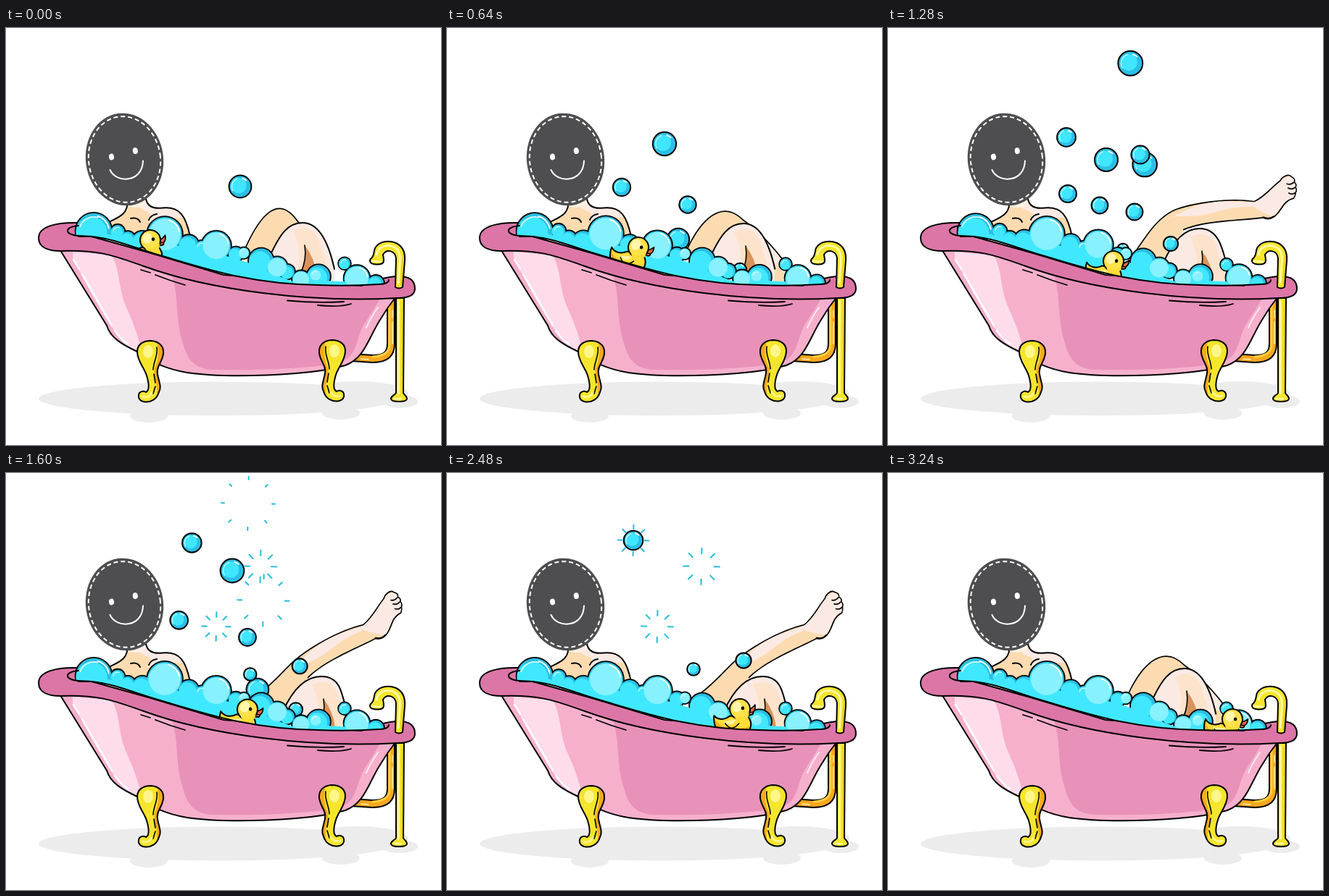
An HTML page with a canvas that plays this animation: 600x576 px, repeating every 3.28 s.

```html
<!DOCTYPE html>
<html lang="en">
<head>
<meta charset="utf-8">
<title>Bubble bath</title>
<style>
  html, body { margin: 0; width: 100%; height: 100%; overflow: hidden; background: #fff; }
  canvas { display: block; width: 600px; height: 576px; }
</style>
</head>
<body>
<canvas id="stage" width="600" height="576"></canvas>
<script>
const ctx = document.getElementById('stage').getContext('2d');
const LOOP = 3280, STEP = 40, REPEAT = 800, POP = 340, TAU = Math.PI * 2;
const rad = deg => deg * Math.PI / 180;

// ---------- helpers ----------
function draw(d, fill, stroke, width = 2) {
  const p = typeof d === 'string' ? new Path2D(d) : d;
  if (fill) { ctx.fillStyle = fill; ctx.fill(p); }
  if (stroke) { ctx.strokeStyle = stroke; ctx.lineWidth = width; ctx.stroke(p); }
}
function oval(x, y, rx, ry = rx, rot = 0) {
  const p = new Path2D();
  p.ellipse(x, y, rx, ry, rot, 0, TAU);
  return p;
}
function arc(x, y, r, from, to, color, width) {
  const p = new Path2D();
  p.arc(x, y, r, rad(from), rad(to));
  draw(p, null, color, width);
}
function inside(clip, paint) {
  ctx.save();
  ctx.clip(new Path2D(clip));
  paint();
  ctx.restore();
}
// Rows are [time, ...values]; returns the blended values.
function at(rows, t) {
  let i = 0;
  while (i < rows.length - 2 && t >= rows[i + 1][0]) i++;
  const a = rows[i], b = rows[i + 1];
  const k = Math.min(1, Math.max(0, (t - a[0]) / (b[0] - a[0])));
  return a.slice(1).map((v, n) => v + (b[n + 1] - v) * k);
}

// ---------- tub ----------
const INNER = 'C88,288 105,287 118,288 C150,291 180,305 216,315 C280,334 340,354 430,355 C470,357 500,355 515,354 C524,354 528,351 528,348';
const ABOVE = 'M85,0 L85,281 ' + INNER + ' L600,345 L600,0 Z';
const RIM = 'M100,269 C70,268 45,274 45,290 C45,303 58,308 75,308 C130,306 150,315 190,329 C280,362 420,380 540,373 C557,373 564,368 564,360 C564,348 555,343 542,343 Q530,343 512,348 L490,356 L300,341 L200,311 L118,288 L100,288 Z';
const TUB = 'M73,304 L139,411 C144,428 160,437 181,447 C200,461 220,471 250,476 C290,482 350,481 400,477 Q440,474 468,466 C495,456 500,428 516,403 Q526,386 538,371 L400,366 L250,340 L150,306 Z';

function ground() {
  const gray = '#ececec';
  draw(oval(292, 512, 247, 23.5), gray);
  draw(oval(485, 505, 70, 17), gray);
  draw(oval(543, 516, 25, 9), gray);
  draw(oval(197, 536, 26, 9), gray);
  draw(oval(462, 532, 26, 9), gray);
}

function drain() {
  const d = 'M531,372 L531,436 C531,452 522,457 506,457 L476,455';
  draw(d, null, '#000', 12);
  draw(d, null, '#f8a81e', 8);
  draw('M529,380 L529,436 C529,449 520,453 506,454', null, '#ffd13c', 3);
  draw('M533,390 v10 m0,6 v30 M490,457 l10,1', null, '#fff1b0', 1.5);
}

function tub() {
  draw(TUB, '#f6b0cc');
  inside(TUB, () => {
    draw('M92,309 L146,314 C158,335 154,358 166,386 Q182,420 188,452 L168,441 Q145,420 92,318 Z', '#fedcea');
    draw('M226,335 C240,365 232,400 244,435 C250,460 262,471 285,472 Q380,474 455,464 C488,455 480,430 496,406 Q508,388 518,370 L380,355 Z', '#e892b9');
    draw('M93,320 l8,13 m4,7 l41,71 m4,7 q8,12 18,18', null, '#fff', 2.5);
    draw('M497,414 Q503,400 513,386', null, '#ffe6f1', 2);
  });
  draw(TUB, null, '#000');
  draw(RIM, '#dc76a7', '#000');
}

function rimLines() {
  draw('M100,273 C90,274 84,277 85,281 ' + INNER, null, '#000');
  draw('M186,334 l13,4 m7,3 q20,8 41,14 M388,376.5 q40,4 78,1.5 M430,383 q30,3 46,-2', null, '#000', 1.8);
}

const FOOT = 'M181,447 C181,438 188,432 200,432 C212,433 218,440 217,450 C215,463 207,467 209,478 C211,490 215,495 211,503 C208,513 200,517 192,516.5 C184,516 181,510 184,504 Q188,500 193,503 C199,500 197,490 194,480 C190,468 181,460 181,447 Z';
function foot() {
  draw(FOOT, '#f5e52c');
  inside(FOOT, () => draw('M207,430 L222,440 L222,500 L205,518 C213,495 203,485 205,470 Q214,450 207,430 Z', '#f6a91f'));
  draw('M208,441 C210,452 203,462 203,472 m1,6 l2,12 m0,5 l-3,10', null, '#000', 1.6);
  draw(FOOT, null, '#000');
  draw(oval(196, 447, 7, 9), '#fff68a');
  draw('M188,509 Q196,512 201,504', null, '#fff68a', 3);
}
function feet() {
  foot();
  ctx.save();
  ctx.translate(649, -1);
  ctx.scale(-1, 1);
  foot();
  ctx.restore();
}

function faucet() {
  const yellow = '#f5e52c', shine = '#fffaa8', shade = '#e3c91c';
  draw('M538,373 V504 C537,507 531,508 531,512 Q531,516 542,516 Q553,516 553,512 C553,508 549,507 548,504 L549,373 Z', yellow, '#000');
  draw('M541.5,377 V505 M536,512 h9', null, shine, 2.5);
  draw('M546.5,378 V503', null, shade, 1.5);
  const neck = 'M537,358 L538,318 C537,308 525,304 520,313 Q521,318 521,322 C520,327 513,327 507,326 C501,325 501,320 504,318 C508,315 507,309 509,304 C515,294 528,293 538,297 C548,302 551,311 550,322 L547,358 Q542,361 537,358 Z';
  draw(neck, yellow);
  draw('M511,313 C513,302 525,298 534,302 C543,306 544,314 543,326 L541,352', null, shine, 3);
  draw('M548,312 L545,354', null, shade, 1.5);
  draw('M505,322 l12,1', null, shine, 2.5);
  draw(neck, null, '#000');
}

// ---------- bather ----------
const SKIN = '#fddbb0', PALE = '#fbe9e3';

function torso() {
  const d = 'M167,238 C170,258 153,262 138,270 L130,310 L260,310 L254,288 C248,260 240,246 216,248.5 C204,250 195,247 193,236 Z';
  draw(d, SKIN);
  inside(d, () => {
    draw('M180,236 C180,254 196,250 200,258 Q192,272 212,280 L222,262 L246,262 L225,240 Z', PALE);
    draw('M167,240 L195,240 Q184,252 168,246 Z', '#fff1e4');
  });
  draw('M138,270 C153,262 170,258 167,238 M193,236 C195,247 204,250 216,248.5 C240,246 248,260 254,288 M172,263 q10,-2 13,5 M197,265 q3,-7 11,-8', null, '#000');
}

function head() {
  const tilt = rad(-8);
  draw(oval(163.5, 181.5, 53.5, 64, tilt), '#4e4e50');
  ctx.setLineDash([6, 4]);
  ctx.lineCap = 'butt';
  draw(oval(163.5, 181.5, 49.5, 59.5, tilt), null, '#fff', 2);
  ctx.lineCap = 'round';
  ctx.setLineDash([]);
  draw(oval(145.5, 178, 3.5, 4.4, tilt), '#fff');
  draw(oval(178.3, 169.7, 3.5, 4.4, tilt), '#fff');
  draw('M143.5,196 C152,215 188,214 189,183.5', null, '#fff');
}

// hip, two thigh handles, knee, shin angle, ankle bend, top of the bent leg
const POSE = {
  fold: [331,304, 350,262, 375,228, 402,268, 60, 0, 409,269],
  rise: [333,304, 350,268, 378,236, 408,266, 48, 0, 409,270],
  mid:  [343,308, 358,286, 373,262, 396,252, -7, -9, 430,277],
  up:   [350,305, 368,292, 383,274, 396,262, -29, 0, 435,281],
  flat: [341,308, 354,283, 366,264, 390,257, 0, 0, 430,275]
};
const LEGS = Object.entries({
  0: 'fold', 480: 'fold', 640: 'rise', 1280: 'mid', 1480: 'up',
  2480: 'up', 2800: 'flat', 3240: 'rise', 3280: 'fold'
}).map(([t, name]) => [+t, ...POSE[name]]);

function raisedLeg([hx, hy, ax, ay, bx, by, kx, ky, shin, bend], left) {
  const atKnee = paint => {
    ctx.save();
    ctx.translate(kx, ky);
    ctx.rotate(rad(shin));
    paint();
    ctx.restore();
  };
  const atAnkle = paint => atKnee(() => {
    ctx.translate(110, 2);
    ctx.rotate(rad(bend));
    paint();
  });
  const curve = (...c) => ctx.bezierCurveTo(...c);

  ctx.beginPath();
  ctx.moveTo(hx, hy);
  curve(ax, ay, bx, by, kx, ky);
  atKnee(() => curve(25, -6, 75, -8, 110, 2));
  atAnkle(() => {
    curve(15, -2, 30, -13, 43, -18);
    curve(46, -22, 56, -25, 58, -19);
    for (const [x, y] of [[59, -11], [59, -4], [57, 3], [53, 9]])
      ctx.quadraticCurveTo(x + 4, y - 4, x, y);
    curve(38, 8, 32, 22, 20, 26);
    curve(14, 28, 9, 26, 6, 23);
  });
  atKnee(() => curve(85, 24, 40, 18, 8, 27));
  ctx.strokeStyle = '#000';
  ctx.lineWidth = 3.4;
  ctx.stroke();
  ctx.lineTo(left + 15, 335);
  ctx.lineTo(hx, 335);
  ctx.fillStyle = SKIN;
  ctx.fill();
  ctx.save();
  ctx.clip();
  atKnee(() => draw('M-4,8 Q30,-6 62,-6 L108,2 L104,8 C75,2 55,12 30,11 Q15,10 -4,8 Z', PALE));
  atAnkle(() => draw('M-8,0 C15,-2 30,-13 43,-20 L64,-22 L62,12 L45,11 C33,14 30,22 20,26 Q8,20 -8,0 Z', PALE));
  ctx.restore();
  atAnkle(() => draw('M50,-12 q4,3 9,1 m-9,5 q4,4 9,2 m-10,5 q4,4 8,2 M6,23 q7,6 14,3', null, '#000', 1.7));
}

function bentLeg(x, y) {
  const k = (y - 269) / 12;
  const lx = x - 46 - 7 * k, ly = y + 48, rx = x + 44 - 9 * k, ry = y + 64 - 14 * k;
  const edge = new Path2D();
  edge.moveTo(lx, ly);
  edge.bezierCurveTo(lx + 15, ly - 33, x - 20, y, x, y);
  edge.bezierCurveTo(x + 24, y, rx - 7, ry - 32, rx, ry);
  const shape = new Path2D(edge);
  shape.lineTo(rx, 352);
  shape.lineTo(lx, 352);
  ctx.save();
  ctx.clip(shape);
  draw(shape, PALE);
  ctx.translate(x + 3, y + 31);
  draw('M-16,-19 C0,-28 14,-22 20,-6 L34,40 L-12,42 Q-1,10 -16,-19 Z', '#fde3cb');
  draw('M0,0 Q14,18 16,40 L-6,40 Q3,20 0,0 Z', '#d9935c');
  draw('M0,0 Q3,20 -5,37', null, '#000', 1.6);
  ctx.restore();
  draw(edge, null, '#000');
}

function legs(t) {
  const pose = at(LEGS, t), [x, y] = pose.slice(-2);
  raisedLeg(pose, x - 50);
  bentLeg(x, y);
}

// ---------- bubbles ----------
// Each rises along [time, x, y] points and pops at the last one.
const track = (r0, r1, ...path) => ({ r0, r1, path, start: path[0][0], end: path[path.length - 1][0] });
const TRACKS = [];
TRACKS.push(track(15.2, 17, [-160, 319, 292], [0, 323, 219], [480, 301, 182], [640, 300, 160], [1120, 336, 85], [1310, 334, 42]));
TRACKS.push(track(11.5, 13.3, [100, 245, 305], [480, 248, 229], [640, 241, 220], [1120, 234, 170], [1280, 246, 151], [1620, 257, 93]));
TRACKS.push(track(15, 17, [680, 345, 328], [1120, 352, 222], [1340, 355, 176]));
TRACKS.push(track(11, 12.8, [150, 335, 320], [480, 340, 254], [640, 332, 244], [1120, 335, 193], [1280, 348, 175], [1480, 351, 129]));
TRACKS.push(track(9, 11, [480, 405, 352], [640, 404, 334], [1120, 391, 312], [1280, 390, 298], [1680, 409, 259], [1960, 410, 221]));
TRACKS.push(track(11, 11.6, [760, 290, 305], [1120, 281, 262], [1280, 292, 245], [1500, 290, 212]));
TRACKS.push(track(8, 9, [1180, 322, 316], [1280, 324, 306], [1680, 340, 271], [1760, 337, 259]));

function bubble(x, y, r) {
  const disc = oval(x, y, r);
  draw(disc, '#2bbfe6');
  draw(oval(x - r * .12, y - r * .08, r * .68), '#40e6ff');
  arc(x, y, r * .76, 150, 250, '#b9f7ff', 1.5);
  arc(x, y, r * .76, 285, 315, '#fff', 1.8);
  draw(disc, null, '#000');
}
function burst(x, y, r, q) {
  const outer = r * (1.45 + .85 * q);
  const len = 2.5 + r * .42 * Math.sin(Math.PI * Math.min(1, q * 1.1));
  const p = new Path2D();
  for (let i = 0; i < 8; i++) {
    const a = i * TAU / 8 + .02, c = Math.cos(a), s = Math.sin(a);
    p.moveTo(x + c * outer, y + s * outer);
    p.lineTo(x + c * (outer - len), y + s * (outer - len));
  }
  draw(p, null, '#2cbfdd', r < 10 ? 1.5 : 2.1);
}
function bubbles(t) {
  for (const { r0, r1, path, start, end } of TRACKS) {
    for (const u of [t, t - REPEAT]) {
      const q = (u - end) / POP;
      if (u < start || q >= 1) continue;
      const [x, y] = at(path, u);
      const r = r0 + (r1 - r0) * Math.min(1, (u - start) / (end - start));
      if (q < .25) bubble(x, y, r);
      if (q >= 0) burst(x, y, r, q);
    }
  }
}

// ---------- foam ----------
const BRIGHT = [
  [168, 291, 10], [188, 294, 14], [270, 303, 9], [121, 281, 24.5], [154, 281, 9.5], [252, 299, 13.5],
  [317, 313, 10], [352, 322, 17], [388, 336, 10], [431, 343, 16], [467, 326, 8], [510, 353, 11]
];
const LIGHT = [
  [219, 285, 24], [290, 300, 20], [328, 311, 7.5], [374, 331, 14], [407, 347, 12], [484, 345, 17.5], [427, 342, 8]
];
function foam(t) {
  const bob = ([x, y, r], i) => [x, y + .8 * Math.sin(TAU * t / 820 + i * 1.7), r];
  const bright = BRIGHT.map(bob), light = LIGHT.map(bob), all = [...bright, ...light];
  for (const [x, y, r] of all) draw(oval(x, y, r), null, '#000', 3.6);
  for (const [x, y, r] of all) draw(oval(x, y, r), '#2bbfe3');
  for (const [x, y, r] of all) draw(oval(x - r * .12, y + r * .1, r * .88), '#40e8ff');
  draw('M97,284 C125,278 160,290 180,292 Q220,296 262,306 Q330,318 364,338 L400,352 L440,349 L500,352 L520,360 L90,360 Z', '#40e8ff');
  for (const [x, y, r] of light) draw(oval(x, y, r * .92), '#87f1ff');
  for (const [x, y, r] of all) {
    if (r > 17) arc(x, y, r * .86, 285, 350, '#fff', 1.8);
    else if (r < 10) arc(x, y, r * .65, 190, 290, '#c8f9ff', 1.4);
  }
  arc(121, 281, 20, 200, 285, '#d8fbff', 1.8);
}

// ---------- duck ----------
const DUCK = [
  [0, 199, 293, -5], [640, 264, 303, 13], [1280, 311, 322, 10], [1920, 355, 331, 7],
  [2480, 404, 326, -2], [2800, 441, 332, 7], [3240, 475, 340, 13]
];
function duck(t) {
  const [x, y, tilt] = at(DUCK, t);
  ctx.save();
  ctx.translate(x, y);
  ctx.rotate(rad(tilt));
  const body = 'M-36,8 C-31,14 -22,15 -14,9 L10,10 Q17,18 13,28 C9,36 0,38 -10,38 C-30,38 -38,24 -36,8 Z';
  draw(body, '#ffdc37');
  inside(body, () => {
    draw('M-38,8 C-30,26 -12,32 16,24 V42 H-38 Z', '#f3ad20');
    draw('M-24,17 L-6,14 Q-10,26 -24,17 Z', '#fff2a0');
  });
  draw(body, null, '#000');
  draw('M-21,19 q8,13 19,1', null, '#000', 1.5);
  draw('M11,1 Q16,1 21,-5 Q22,2 18,5 Q19,10 10,8 Z', '#e8663a', '#000', 1.7);
  draw('M12,5 h6', null, '#000', 1.3);
  draw(oval(0, 0, 14), '#ffe14a', '#000');
  draw('M-8,10 Q8,14 12,4 Q14,15 2,17 Q-6,17 -8,10 Z', '#ffdc37');
  draw(oval(-4, -3, 6.5, 7.5, .3), '#fff5ac');
  draw(oval(4, -1, 2.2, 2.5), '#000');
  ctx.restore();
}

// ---------- loop ----------
function scene(t) {
  ctx.fillStyle = '#fff';
  ctx.fillRect(0, 0, 600, 576);
  ground();
  drain();
  tub();
  inside(ABOVE, () => {
    torso();
    legs(t);
    bubbles(t);
    foam(t);
    duck(t);
  });
  rimLines();
  feet();
  faucet();
  head();
}

ctx.lineCap = ctx.lineJoin = 'round';
const begin = performance.now();
function tick() {
  const t = (performance.now() - begin) % LOOP;
  scene(Math.floor(t / STEP) * STEP);
  requestAnimationFrame(tick);
}
tick();
</script>
</body>
</html>
```
